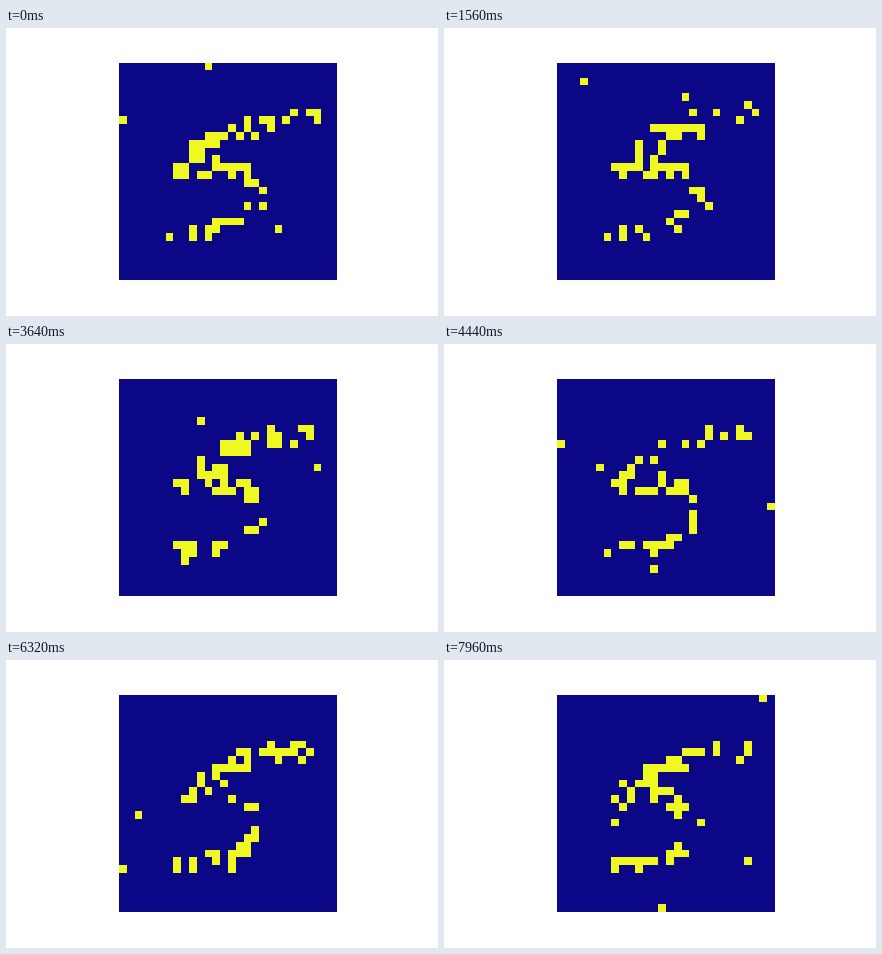
Write a matplotlib script that moves like this. It is 432 by 288 pixels and loops after 8000 ms.

```python
import numpy as np
import matplotlib.pyplot as plt
from matplotlib.animation import FuncAnimation

N = 28          # grid side
STEPS = 200     # time steps per loop
PEAK = 0.54     # spike probability in the middle of a stroke
REACH = 1.55    # distance from a stroke at which spikes fade out
NOISE = 0.008   # background spike probability


def bezier(p0, p1, p2, p3):
    t = np.linspace(0, 1, 80)[:, None]
    p0, p1, p2, p3 = map(np.array, (p0, p1, p2, p3))
    return ((1 - t)**3 * p0 + 3 * t * (1 - t)**2 * p1
            + 3 * t**2 * (1 - t) * p2 + t**3 * p3)


def firing_rate():
    """Spike probability per cell of a hand-written five."""
    pen = np.vstack([
        bezier((24, 6.4), (20, 8), (11.5, 6.5), (8, 13.6)),      # top, left
        bezier((7.4, 13.3), (13, 12.5), (16.5, 13), (17.2, 16.8)),  # bowl
        bezier((17.2, 16.8), (17, 20), (11, 22), (7, 21.8)),     # tail
        np.linspace((12, 9.5), (12.4, 12.5), 20),                # inner ink
    ])
    rows, cols = np.mgrid[:N, :N]
    dist = np.hypot(cols[..., None] - pen[:, 0],
                    rows[..., None] - pen[:, 1]).min(axis=-1)
    return np.maximum(PEAK * np.clip(REACH - dist, 0, 1), NOISE)


RATE = firing_rate()


def spikes(step):
    rng = np.random.default_rng(step)
    return (rng.random((N, N)) < RATE).astype(float)


fig, ax = plt.subplots(figsize=(6, 4), dpi=72, facecolor="white")
fig.subplots_adjust(left=0.125, right=0.9, bottom=0.125, top=0.88)
ax.axis("off")
image = ax.imshow(spikes(0), cmap="plasma", vmin=0, vmax=1,
                  interpolation="nearest")


def update(step):
    image.set_data(spikes(step))
    return [image]


anim = FuncAnimation(fig, update, frames=STEPS, interval=40, repeat=True)
plt.show()
```
